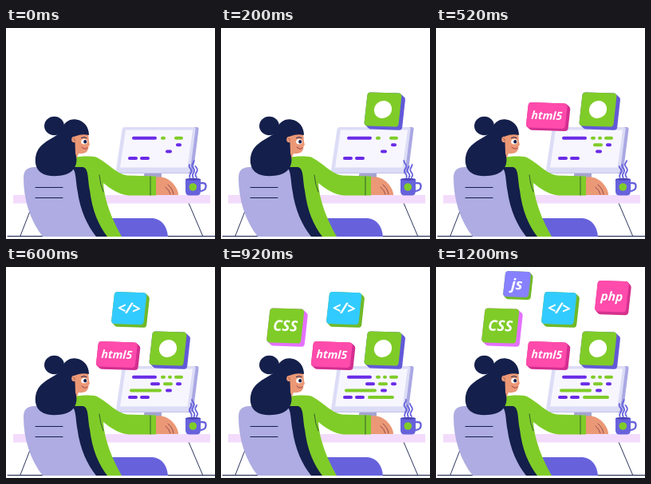
An HTML page with a canvas for the animation above (1.4 s loop, 262 by 264 pixels).

```html
<!DOCTYPE html>
<html lang="en">
<head>
<meta charset="utf-8">
<title>Coding at a desk</title>
<style>
html, body { margin: 0; width: 100%; height: 100%; overflow: hidden; background: #fff; }
canvas { display: block; width: 262px; height: 264px; }
</style>
</head>
<body>
<canvas id="stage"></canvas>
<script>
const STEP = 200, STEPS = 7;
const NAVY = '#141f4b', GREEN = '#7fcc28', PURPLE = '#6762dc', LILAC = '#aeace2',
      SKIN = '#eb9876', PINK = '#ff4bab', INK = '#6a2be6';
const canvas = document.getElementById('stage');
const ctx = canvas.getContext('2d');
const scale = window.devicePixelRatio || 1;
canvas.width = 262 * scale;
canvas.height = 264 * scale;

function fill(d, color) {
  ctx.fillStyle = color;
  ctx.fill(new Path2D(d));
}

function stroke(d, color, width = 1) {
  ctx.strokeStyle = color;
  ctx.lineWidth = width;
  ctx.lineCap = ctx.lineJoin = 'round';
  ctx.stroke(new Path2D(d));
}

function oval(x, y, rx, ry, color) {
  ctx.fillStyle = color;
  ctx.beginPath();
  ctx.ellipse(x, y, rx, ry, 0, 0, Math.PI * 2);
  ctx.fill();
}

// Code dashes: row, left, right, colour, first step shown
const dashes = [
  [0, 158, 189, INK, 0], [0, 194, 200, GREEN, 0], [0, 203, 208, GREEN, 2], [0, 211, 222, GREEN, 0],
  [1, 181, 193, INK, 3], [1, 197, 209, GREEN, 2], [1, 213, 220, INK, 0],
  [2, 155, 195, GREEN, 3], [2, 200, 208, INK, 0],
  [3, 153, 165, INK, 0], [3, 168, 180, INK, 0], [3, 184, 217, GREEN, 4]
];

// Tiles: first step, centre, size, depth, colours, label, font size
const tiles = [
  { from: 1, x: 203, y: 102, w: 43, h: 42, dx: 5, dy: 4, face: GREEN, side: '#6259d8' },
  { from: 2, x: 138.8, y: 109.5, w: 49, h: 31.5, dx: 4, dy: 3, face: PINK, side: '#d32e91', label: 'html5', size: 14 },
  { from: 3, x: 154.2, y: 51.6, w: 40.5, h: 40, dx: 4, dy: 3.5, face: '#32cbff', side: '#70b928', label: '</>', size: 19 },
  { from: 4, x: 80.7, y: 73.5, w: 43, h: 43, dx: 5, dy: 4, face: GREEN, side: '#e471ff', label: 'CSS', size: 18.5 },
  { from: 5, x: 220.4, y: 36.8, w: 39, h: 38.5, dx: 3.5, dy: 3.5, face: PINK, side: '#d5328f', label: 'php', size: 15.5 },
  { from: 6, x: 101.5, y: 21.5, w: 32, h: 32, dx: 3, dy: 3, face: '#8781ff', side: '#70b928', label: 'js', size: 18.5 }
];

function slab(w, h, color) {
  ctx.fillStyle = color;
  ctx.beginPath();
  ctx.roundRect(-w / 2, -h / 2, w, h, 4);
  ctx.fill();
}

function drawTile({ x, y, w, h, dx, dy, face, side, label, size }) {
  ctx.save();
  ctx.translate(x, y);
  ctx.transform(1, 0.035, -0.11, 1, 0, 0);
  ctx.save();
  for (let i = 0; i < 6; i++) {
    slab(w, h, side);
    ctx.translate(dx / 5, dy / 5);
  }
  ctx.restore();
  slab(w, h, face);
  if (label) {
    ctx.transform(1, 0, 0.06, 1, 0, 0);
    ctx.font = `italic 700 ${size}px "Open Sans", "Noto Sans", sans-serif`;
    ctx.textAlign = 'center';
    ctx.textBaseline = 'alphabetic';
    ctx.fillStyle = '#fff';
    ctx.fillText(label, 0, size * 0.35);
  } else {
    oval(0, 0, 11, 11, '#fff');
  }
  ctx.restore();
}

function drawMonitor(step) {
  fill('M174 180H195V188H172Z', '#a5a4cf');
  fill('M150 124H239Q242 124 241.5 127L235 178Q234.5 182 231 182H142Z', '#aaa8e2');
  fill('M149 124H235Q238 124 237.5 127L231 178Q230.5 181.5 227 181.5H141Q137.5 181.5 138 178L145.5 127Q146 124 149 124Z', '#dcdcf6');
  fill('M150 127.5H234L227.5 174.5H143Z', '#f7f6fe');
  for (const [row, left, right, color, from] of dashes) {
    if (step >= from) {
      const y = 137.8 + row * 8.4;
      stroke(`M${left + 2} ${y}H${right - 2}`, color, 4);
    }
  }
}

function drawDesk() {
  stroke('M34 219L18 260M229 219L246.5 260', NAVY, 0.9);
  stroke('M2 260.5H262', NAVY, 1);
  fill('M9 209H256V219.5H9Z', '#f3dcfb');
}

function drawMug(step) {
  for (let i = 0; i < 3; i++) {
    const x = 231.5 + i * 3.7, top = [171, 166, 173][(i + step) % 3];
    let d = '';
    for (let y = 187; y >= top; y--) {
      const dx = Math.sin(y * 0.5 + step * Math.PI + i * 0.4) * 1.3;
      d += `${d ? 'L' : 'M'}${x + dx - (187 - y) * 0.04} ${y}`;
    }
    stroke(d, PURPLE, 1.8);
  }
  stroke('M243 194H247Q251 194 250.5 199Q250 204 242 204', PURPLE, 2.4);
  fill('M225 189H244V204Q244 209.5 239 209.5H230Q225 209.5 225 204Z', PURPLE);
  oval(234.5, 189.3, 9.5, 1.5, '#4b43b8');
  oval(234.3, 199, 4.8, 4.8, GREEN);
}

function drawPerson() {
  fill('M128 238H184C195 239 202 248 203 261H128Z', PURPLE);
  fill('M186 187C195 185 202 188 208 193C213 198 216 204 216 209H186Z', SKIN);
  stroke('M203 196Q209 201 210 208M200 199Q205 203 206 208', '#77394b', 0.8);
  fill('M84 162C95 160 106 160 113 161.5C119 164 127 171 137 178C143 182 147 184 152 184.5L188 185.5V209.5H154C140 208 131 201 122 194C123 216 134 242 145 261H105L84 185Z', GREEN);
  stroke('M181 186V209M117 184Q118 196 122 205', '#345d31', 1);
}

function drawChair() {
  fill('M78 174H96C104 175 102 188 105 203C108 228 116 247 127 261H104Z', NAVY);
  fill('M22 188C22 178 26 174.5 36 174H81C88 176 87 188 89.5 203C93 229 102 247 113 261H46C30 241 22 214 22 188Z', LILAC);
  stroke('M37 199.5H71M37 212.5H71', NAVY, 1);
}

function drawHead() {
  fill('M80 133H103C104 138 103.5 142 105 146L103.5 148C103.5 155 99 158 91 157L88 164L78 168Z', SKIN);
  oval(60.5, 122.5, 12.5, 11.8, NAVY);
  fill('M69 130C72 117 80 113.5 88 114.5C98 116 104 124 104 134Q95 132 88 135C85 135 86 140 86.5 143L87 157C91 168 87 180 74 183.5C64 186 51 186 44 181C35 175 35 160 41 151C48 141 60 138 69 130Z', NAVY);
  oval(85.5, 139.5, 3.3, 3.8, SKIN);
  stroke('M84.5 138Q87 138.5 86 141.5', '#8e4848', 0.7);
  oval(98, 142.3, 3.8, 3.3, '#fff');
  oval(99.2, 142.3, 2, 2.2, NAVY);
  stroke('M94.5 137.5Q98 135.5 101 137.5', NAVY, 1);
  stroke('M95 149Q99 153 102 150', '#8e354b', 0.9);
}

function draw(step) {
  ctx.setTransform(scale, 0, 0, scale, 0, 0);
  ctx.fillStyle = '#fff';
  ctx.fillRect(0, 0, 262, 264);
  drawMonitor(step);
  drawDesk();
  drawMug(step);
  drawPerson();
  drawChair();
  drawHead();
  for (const tile of tiles) if (step >= tile.from) drawTile(tile);
}

const start = performance.now();
function tick() {
  const time = performance.now() - start;
  draw(Math.floor(time / STEP) % STEPS);
  requestAnimationFrame(tick);
}
tick();
</script>
</body>
</html>
```
